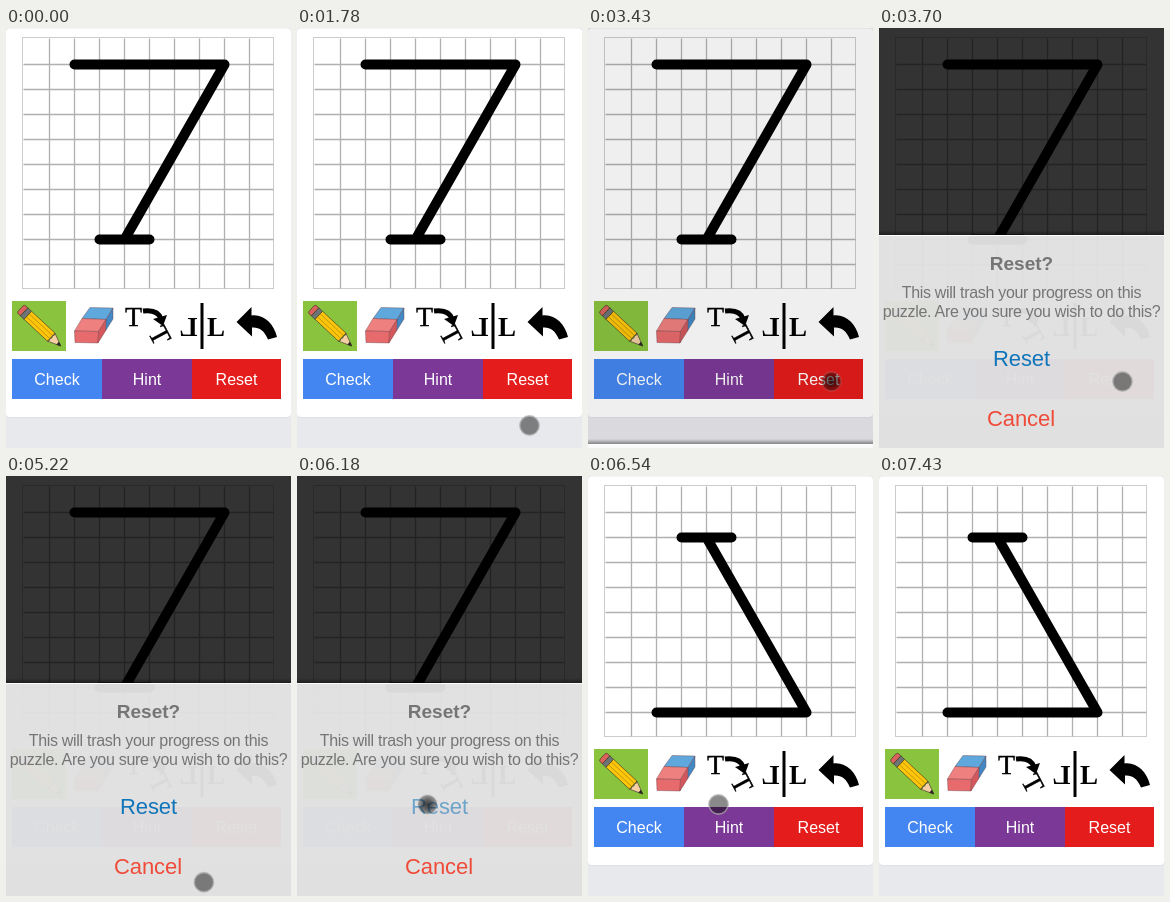
An HTML page for the animation above (8530 ms loop, 285x420 px).

```html
<!DOCTYPE html>
<html lang="en">
<head>
<meta charset="utf-8">
<title>Puzzle reset</title>
<style>
  html, body { margin: 0; width: 100%; height: 100%; overflow: hidden; background: #e8e9ed; }
  svg { display: block; width: 100%; height: 100%; }
  text { font-family: "Liberation Sans", Arial, sans-serif; text-anchor: middle; }
  .serif { font-family: "Liberation Serif", "Times New Roman", serif; }
  .label { font-size: 16px; fill: #fff; }
  .note { font-size: 16px; letter-spacing: -.3px; fill: #757575; }
  .choice { font-size: 22px; letter-spacing: -.1px; }
</style>
</head>
<body>
<svg viewBox="0 0 285 420" preserveAspectRatio="none">
  <defs>
    <radialGradient id="press">
      <stop offset="0" stop-color="#000" stop-opacity=".72"/>
      <stop offset=".5" stop-color="#000" stop-opacity=".56"/>
      <stop offset="1" stop-color="#000" stop-opacity=".3"/>
    </radialGradient>
    <linearGradient id="shadow" x2="0" y2="1">
      <stop offset="0" stop-opacity="0"/>
      <stop offset="1" stop-opacity=".4"/>
    </linearGradient>
  </defs>

  <rect width="285" height="420" fill="#e8e9ed"/>
  <rect y="1" width="285" height="389" rx="4" fill="#e0e1e5"/>
  <rect y=".5" width="285" height="388.5" rx="4" fill="#fff"/>

  <rect x="16.5" y="9.5" width="251" height="251" fill="none" stroke="#ccc"/>
  <g transform="translate(18.5 11.5)" fill="none">
    <path id="grid" stroke="#b0b0b0" stroke-width="1.3"/>
    <path id="figure" d="M50 25H200L100 200M75 200H125" stroke="#000"
      stroke-width="10" stroke-linecap="round" stroke-linejoin="round"/>
  </g>

  <!-- pencil -->
  <rect x="6" y="273" width="54" height="50" fill="#8ac43f"/>
  <g transform="translate(14.5 280.5) rotate(43)" stroke="#3a3325" stroke-width=".6" stroke-linejoin="round">
    <path d="M5-5.5H2Q0-5.5 0-3V3Q0 5.5 2 5.5H5Z" fill="#d9625c"/>
    <rect x="5" y="-5.5" width="5" height="11" fill="#6d7478"/>
    <rect x="10" y="-5.5" width="32" height="11" fill="#fdc60b"/>
    <path d="M10-2H42M10 2H42" stroke="#a67a08"/>
    <path d="M42-5.5L55 0L42 5.5Q44 3.5 42 2Q44 0 42-2Q44-3.5 42-5.5Z" fill="#f3cfa3"/>
    <path d="M51-1.7L55 0L51 1.7Z" fill="#222"/>
  </g>

  <!-- eraser -->
  <g stroke="#6b3a40" stroke-width=".4" stroke-linejoin="round">
    <path d="M84 279.5L107 280L100 291.5L76 290.5Z" fill="#5fa8de"/>
    <path d="M100 291.5L107 280V291L99.5 303Z" fill="#4288c4"/>
    <path d="M76 290.5L100 291.5L92.5 303.5L68.5 303Z" fill="#ef8080"/>
    <path d="M68.5 303L92.5 303.5L92 315L69 314.5Z" fill="#e76a6c"/>
    <path d="M92.5 303.5L100 291.5L99.5 303L92 315Z" fill="#d4575c"/>
  </g>

  <!-- rotate -->
  <g font-size="28" stroke="#000" stroke-width=".4">
    <text class="serif" x="127.500" y="298">T</text>
    <text class="serif" transform="translate(153.5 307.5) rotate(62)" y="9">T</text>
  </g>
  <path d="M137 283Q152 281 155 291" fill="none" stroke="#000" stroke-width="5"/>
  <path d="M147 291L161 287L157 298Z"/>

  <!-- mirror -->
  <rect x="194.5" y="275" width="3" height="46"/>
  <g font-size="27" font-weight="bold">
    <text class="serif" x="210" y="308">L</text>
    <text class="serif" transform="translate(182.5 308) scale(-1 1)">L</text>
  </g>

  <!-- undo -->
  <path d="M230.5 294L245.500 279V287.500C258 286 268 296 271 309L262 311.500C258 302 253 299 246 299.500V308.500Z"/>

  <rect x="6" y="331" width="90" height="40" fill="#4486f1"/>
  <rect x="96" y="331" width="90" height="40" fill="#7b3896"/>
  <rect x="186" y="331" width="89" height="40" fill="#e41c1c"/>
  <text class="label" x="51" y="357">Check</text>
  <text class="label" x="141" y="357">Hint</text>
  <text class="label" x="230.5" y="357">Reset</text>

  <rect id="dim" width="285" height="420"/>
  <g id="sheet">
    <rect y="-5" width="285" height="5" fill="url(#shadow)"/>
    <rect width="285" height="213" fill="#fff" fill-opacity=".85"/>
    <rect width="285" height="1" fill="#fff"/>
    <text x="142.5" y="35" font-size="19" font-weight="bold" fill="#757575">Reset?</text>
    <text class="note" x="142.5" y="63">This will trash your progress on this</text>
    <text class="note" x="142.5" y="82">puzzle. Are you sure you wish to do this?</text>
    <text id="confirm" class="choice" x="142.5" y="131" fill="#1075ba">Reset</text>
    <text class="choice" x="142" y="191" fill="#f04a38">Cancel</text>
  </g>
  <circle id="cursor" r="9.6" stroke="#aaa" stroke-opacity=".75" stroke-width="1.6"/>
</svg>
<script>
  const LOOP = 8530, BEAT = 120;
  const CLOSED = 420, OPEN = 207;
  const $ = id => document.getElementById(id);
  const [grid, figure, dim, sheet, confirmText, cursor] =
    ["grid", "figure", "dim", "sheet", "confirm", "cursor"].map($);

  let lines = "";
  for (let p = 25; p < 250; p += 25) lines += `M${p} -1V249M-1 ${p}H249`;
  grid.setAttribute("d", lines);

  const entry = { x: 232.5, y: 397.5 };
  const resetButton = { x: 243.5, y: 353.5 };
  const confirmButton = { x: 130.5, y: 328.5 };
  const glides = [
    { start: 1780, beats: 4, to: { x: 248.5, y: 355.5 } },
    { start: 2420, beats: 2, to: { x: 249, y: 363.5 } },
    { start: 3070, beats: 1, to: resetButton },
    { start: 4980, beats: 9, to: confirmButton, bend: { x: 185, y: 472 } },
    { start: 7040, beats: 2, to: { x: 196.5, y: 403.5 } }
  ];

  const clamp = v => Math.min(1, Math.max(0, v));
  const ramp = (t, from, to) => clamp((t - from) / (to - from));
  const smooth = p => p * p * (3 - 2 * p);
  const easeOut = p => 1 - (1 - p) ** 2;
  const mix = (a, b, p) => a + (b - a) * p;
  const during = (t, from, to) => t >= from && t < to;
  const beatsSince = (t, start) => Math.floor((t - start) / BEAT);

  const between = (a, b, p) => ({ x: mix(a.x, b.x, p), y: mix(a.y, b.y, p) });

  function cursorAt(t) {
    let spot = entry;
    for (const { start, beats, to, bend } of glides) {
      const p = easeOut(clamp(beatsSince(t, start) / beats));
      const mid = bend || between(spot, to, .5);
      spot = between(between(spot, mid, p), between(mid, to, p), p);
    }
    return spot;
  }

  function drawSheet(t) {
    // The overlay fades evenly while the sheet eases in and drops away faster.
    const held = 3420 + beatsSince(t, 3420) * BEAT;
    const closing = t >= 6180;
    const shown = closing ? 1 - ramp(held, 6200, 6470) : ramp(held, 3400, 3660);
    const rise = closing ? shown ** 2.5 : smooth(shown);
    dim.setAttribute("fill-opacity", .8 * shown);
    sheet.setAttribute("transform", `translate(0 ${Math.round(mix(CLOSED, OPEN, rise))})`);
    sheet.setAttribute("visibility", shown > 0 ? "visible" : "hidden");
    confirmText.setAttribute("fill-opacity", during(t, 6060, 6420) ? .55 : 1);
  }

  function drawCursor(t) {
    const { x, y } = cursorAt(t);
    const pressed = during(t, 3190, 3580) || during(t, 6060, 6300);
    cursor.setAttribute("visibility", during(t, 1780, 7430) ? "visible" : "hidden");
    cursor.setAttribute("cx", x);
    cursor.setAttribute("cy", y);
    cursor.setAttribute("fill", pressed ? "url(#press)" : "#000");
    cursor.setAttribute("fill-opacity", pressed ? 1 : .46);
    cursor.setAttribute("stroke-opacity", pressed ? .2 : .75);
  }

  function draw(t) {
    figure.setAttribute("transform", t >= 6300 ? "translate(0 250) scale(1 -1)" : "");
    drawSheet(t);
    drawCursor(t);
  }

  const start = performance.now();
  function tick() {
    draw((performance.now() - start) % LOOP);
    requestAnimationFrame(tick);
  }
  tick();
</script>
</body>
</html>
```
